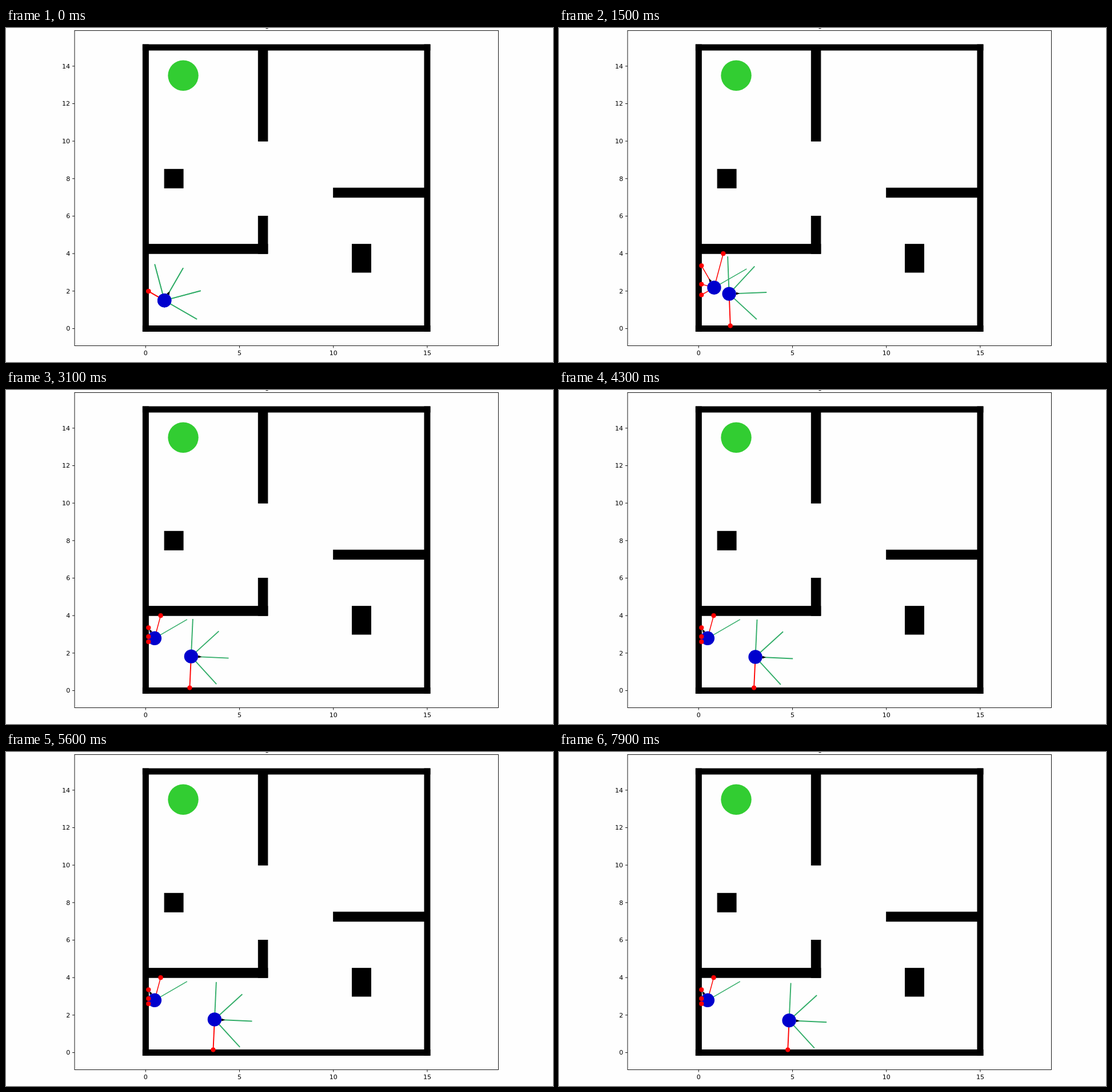
An HTML page that plays this animation: 957 px wide and 585 px high, repeating every 8 s.

```html
<!DOCTYPE html>
<html lang="en">
<head>
<meta charset="utf-8">
<title>Robot simulation</title>
<style>
  html, body { margin: 0; width: 100%; height: 100%; overflow: hidden; background: #fefefe; }
  svg { display: block; }
  text { font: 11.1px "DejaVu Sans", sans-serif; }
</style>
</head>
<body>
<svg id="stage" width="957" height="585" viewBox="0 0 957 585">
  <g id="plot"></g>
  <g id="robots"></g>
</svg>
<script>
const STEP_MS = 100, STEPS = 80, STRIDE = 0.05, RANGE = 2;
const RAD = Math.PI / 180;
const px = x => 244.35 + 32.84 * x;
const py = y => 526.45 - 32.83 * y;

const line = (x1, y1, x2, y2, color, width) =>
  `<line x1="${x1}" y1="${y1}" x2="${x2}" y2="${y2}" stroke="${color}" stroke-width="${width}"/>`;
const disc = (x, y, r, color) => `<circle cx="${x}" cy="${y}" r="${r}" fill="${color}"/>`;
const label = (x, y, text, anchor) => `<text x="${x}" y="${y}" text-anchor="${anchor}">${text}</text>`;

// Obstacles as x, y, width, height in plot units
const walls = [
  [-0.15, -0.15, 15.3, 0.3], [-0.15, 14.85, 15.3, 0.3],
  [-0.15, -0.15, 0.3, 15.3], [14.85, -0.15, 0.3, 15.3],
  [0, 4, 6.5, 0.5], [6, 4, 0.5, 2], [6, 10, 0.5, 5],
  [10, 7, 5, 0.5], [1, 7.5, 1, 1], [11, 3, 1, 1.5]
];

function drawPlot() {
  let out = walls.map(([x, y, w, h]) =>
    `<rect x="${px(x)}" y="${py(y + h)}" width="${w * 32.84}" height="${h * 32.83}" stroke="#000" stroke-width="1.1"/>`
  ).join("");
  out += disc(px(2), py(13.5), 26.7, "#32cd32");
  out += '<rect x="120" y="4.5" width="741.5" height="552" fill="none" stroke="#000" stroke-width=".9"/>';
  for (let x = 0; x <= 15; x += 5)
    out += line(px(x), 556.5, px(x), 560.5, "#000", 0.9) + label(px(x), 573, x, "middle");
  for (let y = 0; y <= 14; y += 2)
    out += line(116, py(y), 120, py(y), "#000", 0.9) + label(112.2, py(y) + 4, y, "end");
  // Descender of the title, cut off by the top edge
  out += '<text x="452.7" y="-1.9" style="font-size:13.3px">g</text>';
  return out;
}

// Integrate a path at constant speed from a heading function (degrees)
function drive(heading, lastStep) {
  const path = [{ x: 1, y: 1.5, a: heading(0) }];
  for (let n = 1; n < STEPS; n++) {
    const { x, y } = path[n - 1];
    const mid = heading(n - 0.5) * RAD;
    path.push(n > lastStep ? path[n - 1] : {
      x: x + STRIDE * Math.cos(mid),
      y: y + STRIDE * Math.sin(mid),
      a: heading(n)
    });
  }
  return path;
}

const turnRight = n => n < 13 ? 60 - 53 * n / 13 : Math.max(-2.6, 7 - 2.4 * (n - 13));
const turnLeft = n => Math.min(120, 60 + 7.5 * n);
const robots = [
  { path: drive(turnLeft, 29), width: 1.5 },
  { path: drive(turnRight, STEPS), width: 1.9 }
];

// Distance along a ray to the nearest wall of the lower left room
function distance(x, y, dx, dy) {
  return Math.min(
    dx < 0 ? (0.15 - x) / dx : Infinity,
    dy < 0 ? (0.15 - y) / dy : Infinity,
    dy > 0 ? (4 - y) / dy : Infinity
  );
}

function drawRobot({ x, y, a }, width) {
  const cx = px(x), cy = py(y);
  let rays = "", hits = "";
  for (let k = -2; k <= 2; k++) {
    const dx = Math.cos((a + 45 * k) * RAD), dy = Math.sin((a + 45 * k) * RAD);
    const d = distance(x, y, dx, dy), hit = d < RANGE;
    const ex = px(x + dx * Math.min(d, RANGE)), ey = py(y + dy * Math.min(d, RANGE));
    rays += line(cx, cy, ex, ey, hit ? "#f00" : "#32ad68", width);
    if (hit) hits += disc(ex, ey, 4.1, "#f00");
  }
  const arrow = `<path d="M0 0H13M13-1.6L17 0L13 1.6Z" stroke="#000" stroke-width="1.1"
    transform="translate(${cx} ${cy}) rotate(${-a})"/>`;
  return rays + arrow + disc(cx, cy, 12.2, "#0000cd") + hits;
}

document.getElementById("plot").innerHTML = drawPlot();
const layer = document.getElementById("robots");
let shown = -1;

function frame() {
  const n = Math.floor(performance.now() / STEP_MS) % STEPS;
  if (n !== shown) {
    layer.innerHTML = robots.map(r => drawRobot(r.path[n], r.width)).join("");
    shown = n;
  }
  requestAnimationFrame(frame);
}
frame();
</script>
</body>
</html>
```
